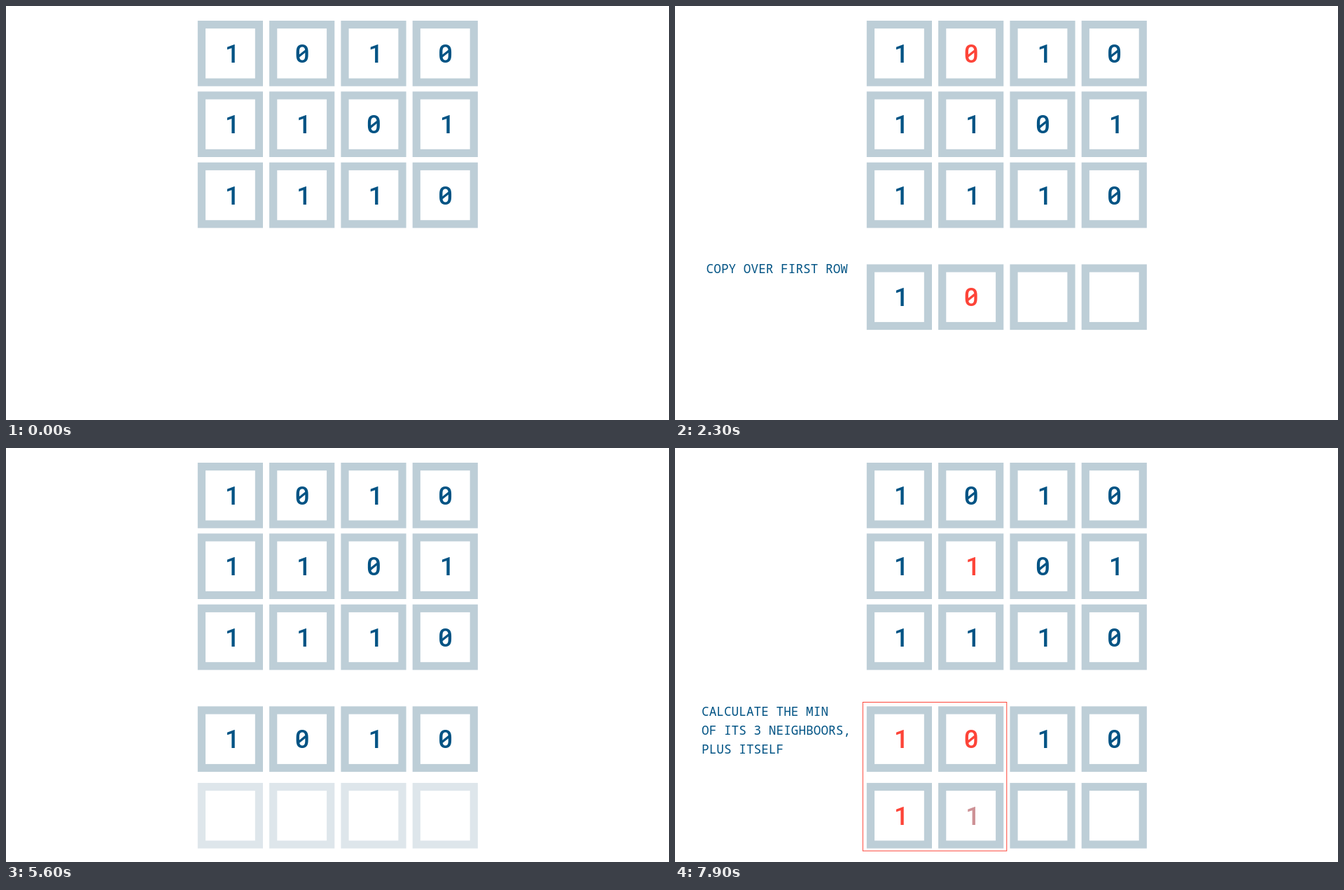
Recreate the animation shown at these times as an HTML page. Size 947 by 592 pixels, loop 8 s.

```html
<!DOCTYPE html>
<html lang="en">
<head>
<meta charset="utf-8">
<title>Grid copy</title>
<style>
  html, body { margin: 0; width: 100%; height: 100%; overflow: hidden; background: #fff; }
  svg { display: block; width: 947px; height: 592px; }
  .cell { fill: #fff; stroke: #bdced7; stroke-width: 11.2; }
  .digit { color: #005384; }
  .digit text { font: 500 36.5px Roboto, "Open Sans", sans-serif; text-anchor: middle; fill: currentColor; }
  .digit path { stroke: currentColor; stroke-width: 3.3; }
  .label { font: 500 17.75px "Roboto Mono", "Noto Sans Mono", monospace; fill: #005384; }
  .frame { fill: none; stroke: #fd4438; stroke-width: 1; }
</style>
</head>
<body>
<svg id="stage" viewBox="0 0 947 592"></svg>
<script>
const LOOP = 8000;
const RED = [253, 68, 56], BLUE = [0, 83, 132];
const ROWS = [21, 122.3, 223.7, 369.4, 478.9];
const GRID = ['1010', '1101', '1110'];
const W = 93.2, H = 93.7;
const stage = document.getElementById('stage');
const sheet = document.head.appendChild(document.createElement('style'));
let tracks = 0;

function add(tag, attrs, parent = stage, text = '') {
  const el = document.createElementNS('http://www.w3.org/2000/svg', tag);
  for (const key in attrs) el.setAttribute(key, attrs[key]);
  el.textContent = text;
  return parent.appendChild(el);
}

// Holds each style from its time in ms until the next one.
function track(el, steps) {
  const name = 'track' + tracks++;
  const frames = Object.entries(steps).map(([ms, css]) => `${ms / LOOP * 100}% { ${css} }`);
  sheet.append(`@keyframes ${name} { ${frames.join(' ')} }\n`);
  el.style.animation = `${name} ${LOOP}ms step-end infinite`;
}

const show = a => `opacity: ${a};`;
const ink = (k, a = 1) =>
  `color: rgb(${BLUE.map((b, i) => Math.round(b + (RED[i] - b) * k))}); ${show(a)}`;
const colX = c => 273.8 + c * 102.3;

function cell(r, c, parent) {
  add('rect', { class: 'cell', x: colX(c) + 5.6, y: ROWS[r] + 5.6, width: W - 11.2, height: H - 11.2 }, parent);
}

function digit(r, c, value) {
  const x = colX(c) + W / 2, y = ROWS[r] + 59.8;
  const g = add('g', { class: 'digit' });
  add('text', { x: x + (value === '1' ? 3 : 0.3), y }, g, value);
  if (value === '0') add('path', { d: `M${x - 4.9} ${y - 8.5}l10.4 -8.3` }, g);
  return g;
}

function label(x, y, lines, steps) {
  const text = add('text', { class: 'label' });
  lines.forEach((line, i) => add('tspan', { x, y: y + i * 26.6 }, text, line));
  track(text, steps);
}

function cellRow(r, steps) {
  const g = add('g', {});
  for (let c = 0; c < 4; c++) cell(r, c, g);
  if (steps) track(g, steps);
}

const fade = (...times) =>
  Object.fromEntries(times.map((t, i) => [t, ink((i + 1) / 3, (i + 1) / 3)]));

for (let r = 0; r < 3; r++) cellRow(r);
cellRow(3, { 0: show(0), 200: show(0.33), 400: show(0.67), 600: show(1) });
cellRow(4, { 0: show(0), 5200: show(0.15), 5600: show(0.5), 6000: show(0.83), 6400: show(1) });

const digits = GRID.map((row, r) => [...row].map((value, c) => digit(r, c, value)));

// First row, copied one digit at a time
const starts = [700, 1700, 2800, 3900, 5000];
for (let c = 0; c < 4; c++) {
  const t = starts[c], end = starts[c + 1], first = c ? t + 200 : t + 100;
  const back = c < 3 ? { [end]: ink(0) } : { 5000: ink(0.5), 5200: ink(0) };
  track(digits[0][c], { 0: ink(0), [t]: ink(1), ...back });
  const copy = { 0: ink(0, 0), ...fade(first, first + 200, first + 400), ...back };
  if (c < 2) copy[7500] = ink(1);
  track(digit(3, c, GRID[0][c]), copy);
}

// Second row
track(digits[1][0], { 0: ink(0), 6400: ink(1), 7500: ink(0) });
track(digits[1][1], { 0: ink(0), 7500: ink(1) });
track(digit(4, 0, '1'), { 0: ink(0, 0), ...fade(6600, 6800, 7000) });
track(digit(4, 1, '1'), { 0: ink(0, 0), 7700: ink(0.33, 0.33), 7900: ink(0.68, 0.6) });

label(44.6, 382.4, ['COPY OVER FIRST ROW'],
  { 0: show(0), 700: show(1), 5000: show(0.5), 5200: show(0) });
label(44.6, 382.4, ['COPY OVER FIRST', 'COLUMN'],
  { 0: show(0), 6400: show(1), 7500: show(0) });
label(38, 383.4, ['CALCULATE THE MIN', 'OF ITS 3 NEIGHBOORS,', 'PLUS ITSELF'],
  { 0: show(0), 7500: show(1) });

track(add('rect', { class: 'frame', x: 268.3, y: 363.5, width: 205.5, height: 212.6 }),
  { 0: show(0), 7500: show(1) });
</script>
</body>
</html>
```
